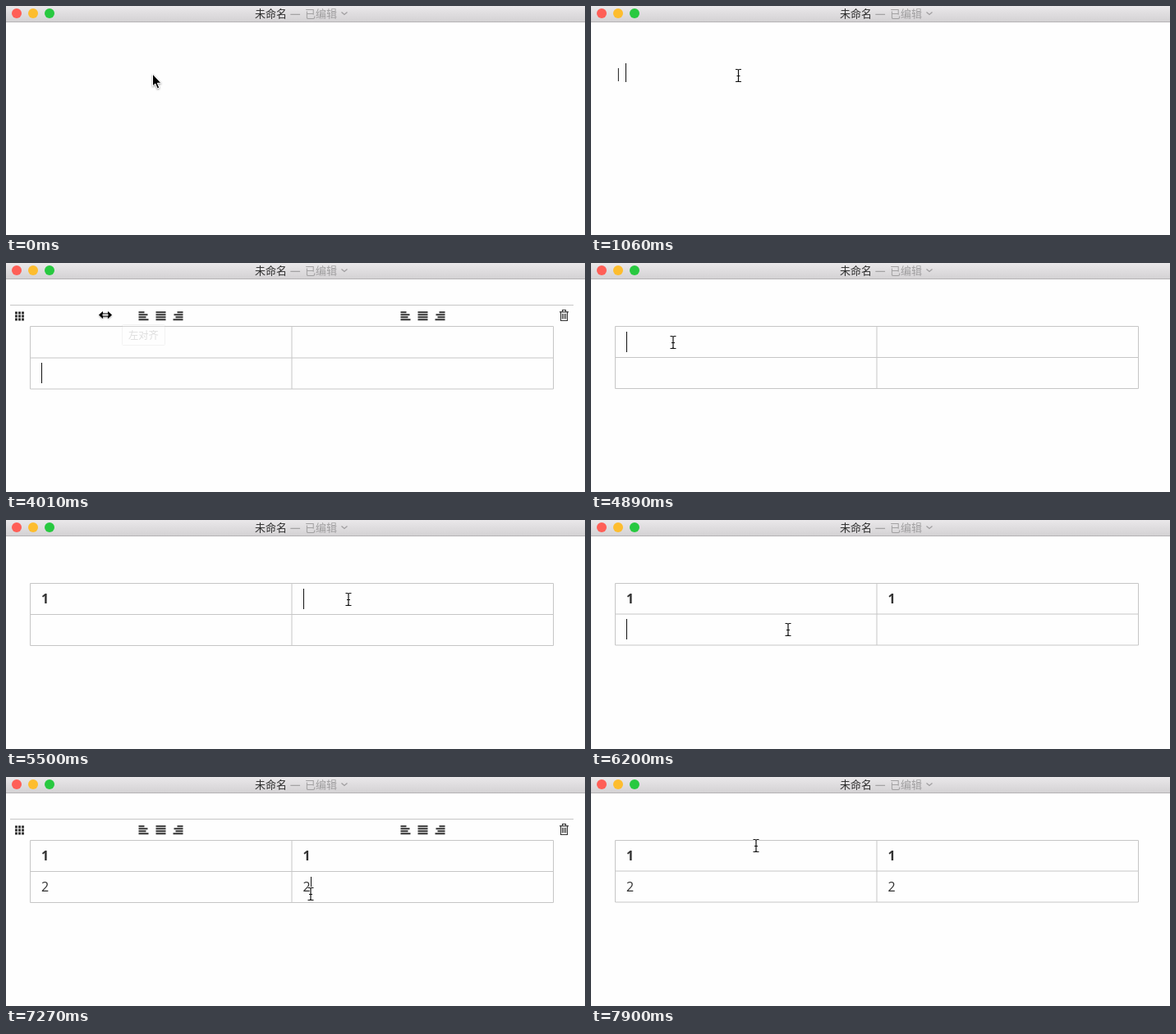
Animation of 705 by 280 pixels, one loop 7990 ms. Source, as an HTML page:

```html
<!DOCTYPE html>
<html lang="zh">
<head>
<meta charset="utf-8">
<style>
  html, body { margin: 0; width: 100%; height: 100%; overflow: hidden; background: #fefefe; }
  svg { display: block; }
  .title { font: 13px "Noto Sans CJK SC", "Noto Sans CJK", "Noto Sans", sans-serif; fill: #a09fa0; }
  .title .name { fill: #2e2e2e; }
  .title .dash { font-size: 14px; stroke: #a09fa0; stroke-width: .4; }
  .title .hint { font-size: 12.3px; fill: #777; }
  .doc { font: 16px "Open Sans", "Noto Sans", sans-serif; fill: #333; white-space: pre; }
  .head { font-weight: 700; }
  .grid { fill: none; stroke: #c6c6c6; }
  .ink { fill: #333; }
  .shadow { filter: drop-shadow(0 1px 1px #0006); }
</style>
</head>
<body>
<svg width="705" height="280" viewBox="0 0 705 280">
  <defs>
    <linearGradient id="bar" x2="0" y2="1">
      <stop stop-color="#eae8ea"/><stop offset="1" stop-color="#d4d2d4"/>
    </linearGradient>
    <path id="left" d="M0 0h7v2h-7zM0 3h11v2h-11zM0 6h9v2h-9zM0 9h12v2h-12z"/>
    <path id="full" d="M0 0h12v2h-12zM0 3h12v2h-12zM0 6h12v2h-12zM0 9h12v2h-12z"/>
    <g id="aligns" class="ink">
      <use href="#left" x="161.5" y="59.3"/>
      <use href="#full" x="182.5" y="59.3"/>
      <use href="#left" transform="translate(215.5 59.3) scale(-1 1)"/>
    </g>
    <path id="beam" d="M-3.5 -7.5h2q1.5 0 1.5 1.5v12q0 1.5 -1.5 1.5h-2M3.5 -7.5h-2q-1.5 0 -1.5 1.5M3.5 7.5h-2q-1.5 0 -1.5 -1.5M-2 .5h4"/>
  </defs>

  <rect width="705" height="280" fill="#fefefe"/>
  <rect width="705" height="19" fill="url(#bar)"/>
  <rect y="19" width="705" height="1" fill="#b5b3b5"/>
  <circle cx="13" cy="9" r="6" fill="#ff5f57"/>
  <circle cx="33" cy="9" r="6" fill="#fdbd2e"/>
  <circle cx="53" cy="9" r="6" fill="#28c940"/>
  <g class="title">
    <text class="name" x="303" y="14">未命名</text>
    <text class="dash" x="346" y="14">—</text>
    <text x="364" y="14">已编辑</text>
    <path d="M408.5 7.5l3.5 3 3.5 -3" fill="none" stroke="#a09fa0" stroke-width="1.3"/>
  </g>

  <text id="line" class="doc" x="29" y="88"></text>

  <g id="table">
    <path id="rules" class="grid"/>
    <text id="a1" class="doc head" x="43" y="102"></text>
    <text id="b1" class="doc head" x="361.6" y="102"></text>
    <text id="a2" class="doc" x="43" y="140"></text>
    <text id="b2" class="doc" x="361.6" y="140"></text>
  </g>

  <g id="tools">
    <path class="grid" d="M5 51.5H691"/>
    <path id="dots" class="ink"/>
    <use href="#aligns"/>
    <use href="#aligns" x="319"/>
    <path d="M674 59.9h11M677.5 59.5v-2h4v2M675.5 60v10.5h8v-10.5M677.5 62v6.5M679.5 62v6.5M681.5 62v6.5" fill="none" stroke="#333" stroke-width="1.1"/>
  </g>

  <g id="tip" class="title">
    <rect x="141.5" y="75.5" width="52" height="25" rx="1" fill="#fff" stroke="#ccc"/>
    <text class="hint" x="149" y="92.5">左对齐</text>
  </g>

  <rect id="caret" width="1" fill="#111"/>

  <path id="arrow" class="shadow" d="M178.5 83v15l3.3 -3 2.5 6 2.5 -1 -2.5 -5.7h4.6z" stroke="#fff"/>
  <g id="beamer" fill="none">
    <use href="#beam" stroke="#fff" stroke-width="2.6"/>
    <use href="#beam" stroke="#111" stroke-width="1.2"/>
  </g>
  <g id="resize" class="shadow">
    <path d="M-8 -.5l5 -4.5v9zM8 -.5l-5 -4.5v9z"/>
    <path d="M-4 -2h8v3h-8z" fill="#fff" stroke="#000"/>
  </g>
</svg>

<script>
const LOOP = 7990, STEP = 88, BLINK = 535;
const el = id => document.getElementById(id);
const show = (id, on) => el(id).style.display = on ? '' : 'none';
const set = (id, attrs) => {
  for (const name in attrs) el(id).setAttribute(name, attrs[name]);
};

// What the writer does: time, action, argument.
const events = [
  [530, 'click', 'line'], [700, 'type', '|'], [1060, 'type', ' '], [1510, 'type', '|'],
  [1870, 'type', ' '], [2230, 'type', '|'], [2760, 'insert'], [2850, 'type', ''],
  [4720, 'click', 'a1'], [4990, 'type', '1'], [5500, 'click', 'b1'], [5680, 'type', '1'],
  [6200, 'click', 'a2'], [6470, 'type', '2'], [7000, 'click', 'b2'], [7270, 'type', '2'],
  [7900, 'leave']
];

// The toolbar hides on a click and returns on typing.
const actions = {
  click(s, field) { s.field = field; s.tools = false; },
  type(s, key) { s.text[s.field] += key; s.tools = s.table; },
  insert(s) { s.table = true; s.text.line = ''; s.field = 'a2'; },
  leave(s) { s.field = null; s.tools = false; }
};

// Where the mouse goes: start, end, target.
const moves = [
  { from: 3830, to: 4010, x: 121, y: 64 },
  { from: 4100, to: 4450, x: 100, y: 97 },
  { from: 5080, to: 5410, x: 417, y: 97 },
  { from: 5770, to: 5860, x: 375, y: 156 },
  { from: 5950, to: 6110, x: 240, y: 134 },
  { from: 6560, to: 6910, x: 371, y: 143 },
  { from: 7450, to: 7810, x: 201, y: 84 }
];

function stateAt(t) {
  const s = { text: { line: '', a1: '', b1: '', a2: '', b2: '' }, field: null, table: false, tools: false, last: 0 };
  for (const [time, action, arg] of events) {
    if (time > t) break;
    actions[action](s, arg);
    s.last = time;
  }
  return s;
}

function pointerAt(t) {
  let x = 179.5, y = 85;
  for (const m of moves) {
    if (t < m.from) break;
    const steps = Math.round((m.to - m.from) / STEP) + 1;
    const p = Math.min(1, (Math.floor((t - m.from) / STEP) + 1) / steps);
    const ease = p * p * (3 - 2 * p);
    x += (m.x - x) * ease;
    y += (m.y - y) * ease;
  }
  return { x, y };
}

function drawCaret(s, t, mid) {
  const lit = s.field && Math.floor((t - s.last) / BLINK) % 2 === 0;
  show('caret', lit);
  if (!lit) return;
  const text = el(s.field), inLine = s.field === 'line';
  const y = inLine ? 70 : s.field.endsWith('1') ? 84 : Math.floor(mid + 6.5);
  const width = s.text[s.field] ? text.getComputedTextLength() : 0;
  set('caret', { x: Math.round(+text.getAttribute('x') + width), y, height: inLine ? 23 : 25 });
}

function draw(t) {
  const s = stateAt(t);
  for (const id in s.text) el(id).textContent = s.text[id];

  // An empty heading and the toolbar each push the rules down a little.
  const mid = 115 + (s.text.b1 ? 0 : .5) + (s.tools ? .5 : 0), end = mid + 38;
  set('rules', { d: `M29.5 77.5H666.5V${end}H29.5ZM29.5 ${mid}H666.5M348 77.5V${end}` });
  show('table', s.table);
  show('tools', s.tools);
  el('tip').style.opacity = Math.max(0, .28 - Math.abs(t - 4050) / 800);
  drawCaret(s, t, mid);

  const { x, y } = pointerAt(t);
  const onBar = s.tools && y > 56 && y < 72;
  show('arrow', t < 260);
  show('beamer', t >= 260 && !onBar);
  show('resize', onBar);
  for (const id of ['beamer', 'resize']) set(id, { transform: `translate(${x} ${y})` });
}

let dots = '';
for (let i = 0; i < 9; i++) dots += `M${11 + i % 3 * 4} ${59.5 + Math.floor(i / 3) * 4}h3v3h-3z`;
set('dots', { d: dots });

const start = performance.now();
function tick() {
  draw((performance.now() - start) % LOOP);
  requestAnimationFrame(tick);
}
tick();
</script>
</body>
</html>
```
